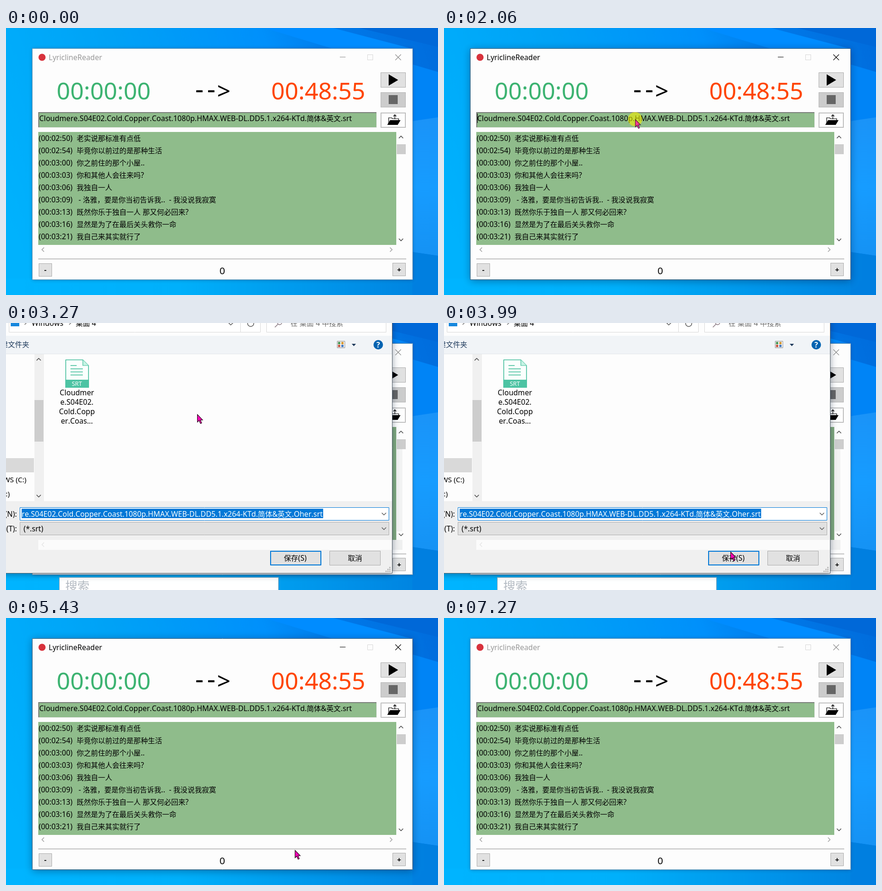
Recreate the animation shown at these times as an HTML page with a canvas. Size 911x565 px, loop 7.36 s.

```html
<!DOCTYPE html>
<html lang="zh">
<head>
<meta charset="utf-8">
<title>LyriclineReader</title>
<style>
html, body { margin: 0; width: 100%; height: 100%; overflow: hidden; background: #0098f4; }
canvas { display: block; }
</style>
</head>
<body>
<canvas id="stage" width="911" height="565"></canvas>
<script>
const W = 911, H = 565, LOOP = 7360;
const c = document.getElementById('stage').getContext('2d');
c.fontKerning = 'none';
const GREEN = '#8fbc8b', BLUE = '#0078d7', PAPER = '#fdfdfd';
const FILE = 'Cloudmere.S04E02.Cold.Copper.Coast.1080p.HMAX.WEB-DL.DD5.1.x264-KTd.简体&英文';
const LINES = [
  ['02:50', '老实说那标准有点低'],
  ['02:54', '毕竟你以前过的是那种生活'],
  ['03:00', '你之前住的那个小屋..'],
  ['03:03', '你和其他人会往来吗?'],
  ['03:06', '我独自一人'],
  ['03:09', ' - 洛雅，要是你当初告诉我..  - 我没说我寂寞'],
  ['03:13', '既然你乐于独自一人 那又何必回来?'],
  ['03:16', '显然是为了在最后关头救你一命'],
  ['03:21', '我自己来其实就行了']
];

const clamp = v => Math.max(0, Math.min(1, v));
const span = (t, a, b) => clamp((t - a) / (b - a));
const ease = p => p * p * (3 - 2 * p);
const mix = (a, b, p) => a + (b - a) * p;
const within = (t, a, b) => t >= a && t < b;

function rect(x, y, w, h, fill, edge, lw = 1) {
  c.fillStyle = fill;
  c.fillRect(x, y, w, h);
  if (edge) {
    c.strokeStyle = edge;
    c.lineWidth = lw;
    c.strokeRect(x + lw / 2, y + lw / 2, w - lw, h - lw);
  }
}

function poly(pts, fill) {
  c.beginPath();
  pts.forEach(([x, y]) => c.lineTo(x, y));
  c.closePath();
  c.fillStyle = fill;
  c.fill();
}

function line(pts, color, lw = 1) {
  c.beginPath();
  pts.forEach(([x, y], i) => i ? c.lineTo(x, y) : c.moveTo(x, y));
  c.strokeStyle = color;
  c.lineWidth = lw;
  c.stroke();
}

function disc(x, y, r, fill) {
  c.beginPath();
  c.arc(x, y, r, 0, 7);
  c.fillStyle = fill;
  c.fill();
}

// Chinese runs are set slightly smaller than Latin ones.
function text(s, x, y, fill = '#000', size = 15.6, align = 0, weight = 400) {
  const runs = s.match(/[\u2e80-\uffef]+|[^\u2e80-\uffef]+/g).map(r => {
    const wide = r.charCodeAt(0) >= 0x2e80;
    const font = wide
      ? `${weight} ${size * 0.964}px "Noto Sans CJK SC", "Noto Sans CJK", sans-serif`
      : `${weight} ${size}px "Noto Sans", "Open Sans", sans-serif`;
    c.font = font;
    return { r, font, w: c.measureText(r).width };
  });
  const total = runs.reduce((n, q) => n + q.w, 0);
  c.fillStyle = fill;
  x -= total * align;
  for (const q of runs) {
    c.font = q.font;
    c.fillText(q.r, x, y);
    x += q.w;
  }
  return total;
}

function chevron(x, y, dx, dy, color, lw = 1.6, s = 4.5) {
  const h = s / 2;
  line(dx
    ? [[x - dx * h, y - s], [x + dx * h, y], [x - dx * h, y + s]]
    : [[x - s, y - dy * h], [x, y + dy * h], [x + s, y - dy * h]], color, lw);
}

function gradient(x0, y0, x1, y1, ...stops) {
  const g = c.createLinearGradient(x0, y0, x1, y1);
  stops.forEach(([p, color]) => g.addColorStop(p, color));
  return g;
}

function desktop() {
  rect(0, 0, W, H, gradient(0, 400, W, 60,
    [0, '#00b2fd'], [0.35, '#00a2f6'], [0.66, '#0090fb'], [0.82, '#0078e8'], [1, '#006ddd']));
  rect(0, 530, W, 35, gradient(0, 0, W, 0,
    [0, '#00b4ff'], [0.4, '#00b0fb'], [0.6, '#00a0f0'], [0.8, '#0090e8'], [1, '#0080de']));
  poly([[545, 0], [690, 0], [857, 44], [690, 44]], '#008cff');
  poly([[745, 0], [911, 0], [911, 40]], '#0068d8');
  poly([[857, 77], [911, 93], [911, 190], [857, 197]], '#0084f6');
  poly([[857, 197], [911, 189], [911, 482], [857, 474]], gradient(0, 190, 0, 482,
    [0, '#1a93f8'], [0.5, '#169cff'], [1, '#1592f4']));
  poly([[857, 474], [911, 482], [911, 565], [857, 565]], '#007fe0');
}

function shadowed(x, y, w, h, fill, blur, alpha, dy) {
  c.save();
  c.shadowColor = `rgba(0,20,50,${alpha})`;
  c.shadowBlur = blur;
  c.shadowOffsetY = dy;
  rect(x, y, w, h, fill);
  c.restore();
}

function folderIcon() {
  line([[807, 204], [807, 190], [813, 190], [815, 192], [828, 192], [828, 195]], '#000', 1.2);
  poly([[804, 205], [810, 195], [832, 195], [826, 205]], '#000');
  line([[820, 193], [820, 184]], '#000', 1.2);
  line([[817, 187], [820, 183.5], [823, 187]], '#000', 1.2);
}

function mainWindow(active, caret) {
  shadowed(56, 43, 801, 489, PAPER, active ? 16 : 8, active ? 0.42 : 0.32, active ? 3 : 1);
  rect(55, 43, 803, 490, PAPER, active ? '#35566e' : '#6f96b0');
  disc(76, 62, 7.5, '#d8323c');
  const ink = active ? '#000' : '#8c8c8c';
  text('LyriclineReader', 90, 68, active ? '#000' : '#999');
  line([[704, 61.5], [716, 61.5]], ink);
  c.strokeStyle = '#d8d8d8';
  c.strokeRect(762.5, 56.5, 11, 11);
  line([[821, 56], [833, 68]], ink, 1.1);
  line([[833, 56], [821, 68]], ink, 1.1);

  text('00:00:00', 206, 150.5, '#3cb371', 50, 0.5);
  text('00:48:55', 658.5, 150.5, '#ff4500', 50, 0.5);
  text('-', 399, 149, '#000', 55);
  text('-', 424, 149, '#000', 55);
  text('>', 445, 151, '#000', 50);

  rect(790, 94, 53, 32, '#e1e1e1', '#adadad');
  poly([[807, 98], [827, 110], [807, 122]], '#000');
  rect(790, 136, 53, 32, '#cccccc', '#b4b4b4');
  rect(807, 142, 19, 19, '#666');
  rect(790, 179, 53, 32, PAPER, '#adadad');
  rect(791, 180, 51, 30, PAPER, '#d4d4d4');
  folderIcon();

  rect(68, 178, 714, 33, GREEN);
  rect(68, 178, 714, 2, '#7a7f7a');
  rect(68, 178, 2, 33, '#7a7f7a');
  rect(68, 210, 714, 1, '#e3e3e3');
  rect(781, 178, 1, 33, '#e3e3e3');
  text(FILE + '.srt', 70, 197);
  if (caret) rect(70, 181, 1, 20, '#000');

  rect(68, 220, 755, 239, GREEN);
  LINES.forEach(([time, words], i) => {
    text(`(00:${time})`, 69, 239 + i * 26);
    text(words, 149, 239 + i * 26);
  });
  chevron(833, 231, 0, -1, '#505050');
  rect(824, 246, 19, 21, '#cdcdcd');
  chevron(833, 448, 0, 1, '#505050');
  chevron(78, 469, -1, 0, '#a3a3a3');
  chevron(812, 469, 1, 0, '#a3a3a3');

  rect(68, 488, 776, 1, '#a0a0a0');
  rect(68, 489, 776, 1, '#e3e3e3');
  rect(69, 498, 28, 28, '#e1e1e1', '#adadad');
  rect(815, 497, 28, 28, '#e1e1e1', '#adadad');
  text('-', 83, 517, '#000', 15, 0.5, 700);
  text('+', 829, 517, '#000', 15, 0.5, 700);
  text('0', 456, 520.5, '#000', 20.5, 0.5);
}

function paleStrip() {
  rect(68, 459, 746, 21, '#fbfbfb');
  chevron(78, 469, -1, 0, '#e6e6e6');
}

function dialogBase() {
  rect(815, 220, 8, 239, '#82ab7f');
  rect(824, 267, 12, 174, '#f3f3f3');
  rect(815, 459, 21, 21, '#f0f0f0');
  shadowed(-20, -20, 834, 549, PAPER, 14, 0.45, 3);
  rect(-20, -20, 835, 550, PAPER, '#56616a');
  rect(0, 458, 814, 71, '#f0f0f0');
}

function loadingDialog() {
  dialogBase();
  rect(0, 116, 80, 30, '#d9d9d9');
  paleStrip();
  rect(556, 481, 110, 33, PAPER);
  rect(681, 481, 110, 33, PAPER);
  rect(793, 508, 21, 20, PAPER);
  text('正在处理...', 413, 101, '#6d6d6d');
}

function fileIcon() {
  c.lineJoin = 'round';
  poly([[126, 78], [162, 78], [174, 90], [174, 136], [126, 136]], '#fafffd');
  c.strokeStyle = '#45bf9d';
  c.lineWidth = 1.6;
  c.stroke();
  poly([[162, 78], [174, 90], [162, 90]], '#c6f3e4');
  line([[162, 78], [162, 90], [174, 90]], '#45bf9d', 1.2);
  line([[136, 90], [149, 90]], '#45bf9d', 1.6);
  for (let y = 97; y < 114; y += 6.5) line([[136, y], [162, y]], '#45bf9d', 1.6);
  rect(125, 120, 50, 17, '#4dc3a3');
  text('SRT', 149.5, 133, '#fff', 12.5, 0.5);
}

function dialogTop() {
  rect(6, -10, 531, 30, '#fff', '#d9d9d9');
  rect(494, 0, 1, 20, '#d9d9d9');
  rect(549, -10, 253, 30, '#fff', '#d9d9d9');
  rect(10, -8, 18, 15, '#1687dd');
  chevron(41, 0, 1, 0, '#666', 1.2, 3.5);
  text('Windows', 54, 6);
  chevron(135, 0, 1, 0, '#666', 1.2, 3.5);
  text('桌面 4', 147, 6);
  chevron(474, 2, 0, 1, '#555', 1.4);
  c.beginPath();
  c.arc(516, 1, 6.5, 0, 7);
  c.strokeStyle = '#555';
  c.lineWidth = 1.4;
  c.stroke();
  line([[567, 9], [574, 2]], '#7c6a75', 1.3);
  c.beginPath();
  c.arc(577, -1, 4.5, 0, 7);
  c.stroke();
  text('在 桌面 4 中搜索', 600, 6, '#6d6d6d');

  rect(0, 27, 814, 39, '#f1f4f7');
  rect(0, 65, 814, 1, '#e2e6ea');
  text('新建文件夹', 49, 51, '#1e395b', 15.6, 1);
  rect(698, 38, 17, 15, '#fff', '#8a8a8a');
  ['#4f9a5d', '#d69a3c', '#c95a46', '#4c7fc0'].forEach((color, i) =>
    rect(700 + (i % 2) * 7, 40 + (i >> 1) * 6, 5, 5, color));
  poly([[729, 44], [738, 44], [733.5, 49]], '#1e395b');
  disc(785, 46, 10, '#0063b1');
  text('?', 785, 51.5, '#fff', 15.5, 0.5, 700);
}

function saveDialog(t) {
  dialogBase();
  dialogTop();
  const pressed = t >= 4580;

  rect(60, 66, 20, 311, '#f0f0f0');
  rect(60, 163, 19, 88, '#cdcdcd');
  chevron(69, 77, 0, -1, '#505050');
  chevron(69, 366, 0, 1, '#505050');
  rect(0, 286, 59, 30, '#d9d9d9');
  text('WINDOWS (C:)', 43, 337, '#000', 15, 1);
  text('(D:)', 8, 367, '#000', 15, 1);

  fileIcon();
  ['Cloudmer', 'e.S04E02.', 'Cold.Copp', 'er.Coas...'].forEach((s, i) =>
    text(s, 149.5, 153 + i * 20, '#000', 15.6, 0.5));

  rect(0, 377, 814, 152, '#f0f0f0');
  text('(N):', 23, 410, '#000', 15.6, 1);
  text('(T):', 23, 441, '#000', 15.6, 1);
  rect(29, 390, 779, 28, '#fff', BLUE);
  const name = (FILE + '.Oher.srt').slice(pressed ? 0 : 7);
  const wide = text(name, 33, 409.5);
  rect(33, 393, wide + 1, 20, BLUE);
  text(name, 33, 409.5, '#fff');
  chevron(797, 404, 0, 1, '#505050', 1.2);

  const hot = within(t, 3760, 3860);
  rect(29, 421, 779, 28, hot ? '#e5f1fb' : '#e1e1e1', hot ? BLUE : '#adadad');
  text('(*.srt)', 37, 441);
  chevron(797, 435, 0, 1, '#505050', 1.2);
  paleStrip();

  const hover = span(t, 4000, 4220);
  const face = `rgb(${mix(225, 229, hover)},${mix(225, 241, hover)},${mix(225, 251, hover)})`;
  if (pressed) rect(557, 482, 108, 31, '#cce4f7', '#005499');
  else rect(557, 482, 108, 31, face, BLUE, 2);
  rect(682, 482, 108, 31, '#e1e1e1', '#adadad');
  text('保存(S)', 610, 503, '#000', 15.6, 0.5);
  text('取消', 736, 503, '#000', 15.6, 0.5);
  for (let i = 0; i < 3; i++)
    for (let j = 0; j <= i; j++) rect(808 - j * 4, 516 + i * 4, 3, 3, '#bdbdbd');
}

function searchBox() {
  rect(112, 538, 463, 40, '#fff', '#9aa5ad');
  text('搜索', 125, 566, '#b4bac2', 26.5);
}

function pointerAt(t) {
  if (t < 800 || t >= 6760) return null;
  if (t < 1520) {
    const p = ease(span(t, 770, 1520)), q = 1 - p;
    return [q * q * 594 + 2 * p * q * 545 + p * p * 403,
            q * q * 556 + 2 * p * q * 420 + p * p * 193];
  }
  if (t < 3990) {
    const p = ease(span(t, 3260, 3990));
    return [mix(403, 604, p), mix(193, 484, p)];
  }
  if (t < 6330) {
    const p = span(t, 3990, 4190);
    return [mix(604, 609, p), mix(484, 491, p)];
  }
  const p = span(t, 6310, 6760);
  return [mix(609, 680, p * p), mix(491, 568, p * p)];
}

function pointer(t) {
  const at = pointerAt(t);
  if (!at) return;
  const press = within(t, 2060, 2150) || within(t, 2250, 2350) || within(t, 4580, 4700);
  c.save();
  c.translate(...at);
  if (press) {
    disc(0, 0, 15, 'rgba(240,240,0,.6)');
    c.globalAlpha = 0.72;
  }
  const shape = [[0.5, 0.5], [0.5, 16.5], [4, 13], [7, 19.5], [9.5, 18.5], [6.8, 12], [11.5, 12]];
  c.lineJoin = 'miter';
  poly(shape, '#ff00b8');
  c.strokeStyle = '#1a0012';
  c.lineWidth = 1.1;
  c.stroke();
  c.restore();
}

function draw(t) {
  c.clearRect(0, 0, W, H);
  const active = within(t, 2060, 2570) || within(t, 4760, 7270);
  const caret = within(t, 2060, 2570) || within(t, 4860, 5430) ||
    within(t, 5920, 6450) || within(t, 6970, 7270);
  desktop();
  mainWindow(active, caret);
  if (within(t, 2690, 4860)) searchBox();
  if (within(t, 2570, 4890)) {
    c.globalAlpha = Math.min(mix(0.5, 1, span(t, 2570, 2600)), 1 - span(t, 4760, 4880));
    if (t < 2690) loadingDialog();
    else saveDialog(t);
    c.globalAlpha = 1;
  }
  pointer(t);
}

const start = performance.now();
function tick() {
  draw((performance.now() - start) % LOOP);
  requestAnimationFrame(tick);
}
tick();
</script>
</body>
</html>
```
